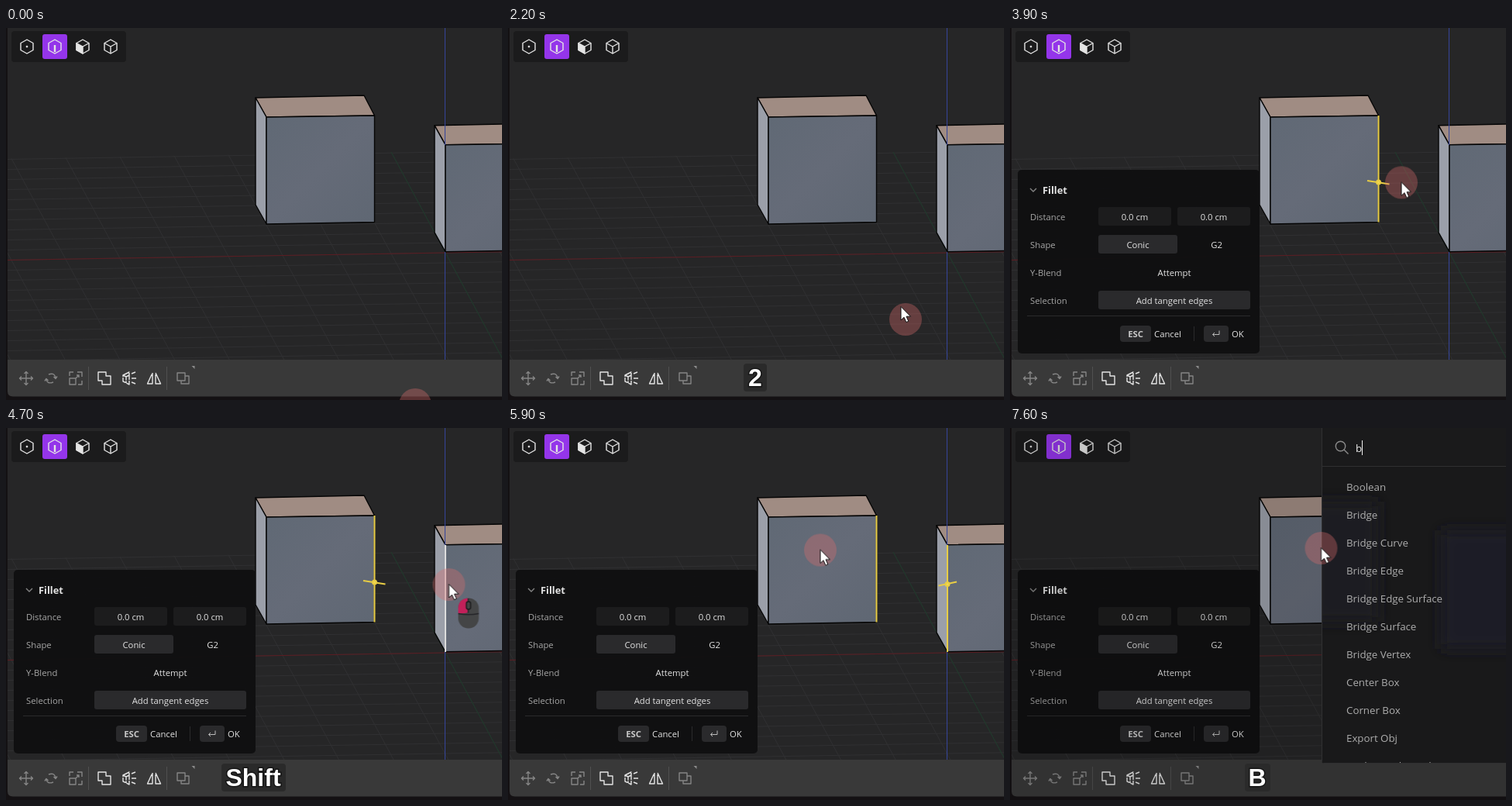
Write an HTML page that moves like this. It is 640 by 480 pixels and loops after 8000 ms.

```html
<!DOCTYPE html>
<html lang="en">
<head>
<meta charset="utf-8">
<title>Fillet two edges</title>
<style>
html, body { margin: 0; width: 100%; height: 100%; overflow: hidden; background: #141113; }
svg { display: block; width: 100vw; height: 100vh; }
text { font-family: "Open Sans", "Noto Sans", sans-serif; font-size: 11.3px; fill: #e2e2e2; }
.line { fill: none; stroke: #e4e4e4; stroke-width: 1.4; stroke-linejoin: round; }
.off { stroke: #858585; }
.mid { text-anchor: middle; font-weight: 500; }
.label { fill: #a6a6a6; }
.bold { font-weight: 700; }
.item { font-size: 13.3px; fill: #adadad; }
.tool { font-size: 13px; }
.key text { font: bold 32px "Liberation Sans", Arial, sans-serif; text-anchor: middle; fill: #fff; stroke: #151515; stroke-width: 3px; paint-order: stroke; }
.key rect { fill: #2a2a2a; }
.cube { stroke: #050505; stroke-width: 1.4; stroke-linejoin: round; }
.pick { stroke: #e8cd45; stroke-width: 2; }
.hover { stroke: #f2f2f2; stroke-width: 1.8; }

/* 100 ms is 1.25 % of the loop */
.t { animation: 8s step-end -20ms infinite; }
.two { animation-name: two; }
.shift { animation-name: shift; }
.keyF { animation-name: keyF; }
.keyB { animation-name: keyB; }
.click { animation-name: click; }
.hover1 { animation-name: hover1; }
.hover2 { animation-name: hover2; }
.filletOn { animation-name: filletOn; }
.first { animation-name: first; }
.second { animation-name: second; }
.dim { animation-name: dim; }
.all { animation-name: all; }
.blink { animation-name: blink; }
.found { animation-name: found; }
.pointer { animation-name: pointer; }
.halo { animation-name: halo; }

@keyframes two { 0%, 31.25% { visibility: hidden } 21.25% { visibility: visible } }
@keyframes shift { 0%, 61.25% { visibility: hidden } 51.25% { visibility: visible } }
@keyframes keyF { 0%, 90% { visibility: hidden } 80% { visibility: visible } }
@keyframes keyB { 0% { visibility: hidden } 91.25%, 100% { visibility: visible } }
@keyframes click { 0%, 45%, 62.5% { visibility: hidden } 41.25%, 58.75% { visibility: visible } }
@keyframes hover1 { 0%, 41.25% { visibility: hidden } 36.25% { visibility: visible } }
@keyframes hover2 { 0%, 61.25% { visibility: hidden } 53.75% { visibility: visible } }
@keyframes filletOn { 0% { visibility: hidden } 46.25%, 100% { visibility: visible } }
@keyframes first { 0%, 61.25% { visibility: hidden } 46.25% { visibility: visible } }
@keyframes second { 0% { visibility: hidden } 61.25%, 100% { visibility: visible } }
@keyframes dim { 0% { visibility: hidden } 81.25%, 100% { visibility: visible } }
@keyframes all { 0%, 92.5% { visibility: hidden } 81.25% { visibility: visible } }
@keyframes blink { 0%, 87.5% { visibility: hidden } 81.25% { visibility: visible } }
@keyframes found { 0% { visibility: hidden } 92.5%, 100% { visibility: visible } }
@keyframes pointer {
  0% { transform: translate(528px, 486px) }
  5% { transform: translate(528px, 486px); animation-timing-function: steps(8) }
  15% { transform: translate(517px, 386px) }
  27.5% { transform: translate(507px, 360px); animation-timing-function: steps(4) }
  32.5% { transform: translate(592px, 285px); animation-timing-function: steps(3) }
  36.25% { transform: translate(492px, 204px) }
  37.5% { transform: translate(484px, 198px) }
  38.75% { transform: translate(486px, 199px) }
  47.5% { transform: translate(486px, 199px); animation-timing-function: steps(3) }
  51.25% { transform: translate(543px, 200px); animation-timing-function: steps(3) }
  55% { transform: translate(571.5px, 202px) }
  63.75% { transform: translate(571.5px, 202px); animation-timing-function: steps(8) }
  73.75% { transform: translate(403px, 157.5px) }
  75% { transform: translate(404px, 157px) }
  76.25%, 100% { transform: translate(401.5px, 155px) }
}
@keyframes halo {
  0%, 28.75% { transform: none }
  27.5% { transform: translate(6px, 16px) }
}
</style>
</head>
<body>
<svg viewBox="0 0 640 480" preserveAspectRatio="none">
  <defs>
    <linearGradient id="front" x1="0" y1="0" x2="1" y2="1">
      <stop offset="0" stop-color="#606975"/><stop offset=".5" stop-color="#656b78"/><stop offset="1" stop-color="#5f6773"/>
    </linearGradient>
    <filter id="soft" x="-50%" y="-50%" width="200%" height="200%"><feGaussianBlur stdDeviation="9"/></filter>
    <clipPath id="tall"><path d="M402 0H640V480H402z"/></clipPath>
    <clipPath id="short"><path d="M402 0H640V433H406q-4 0-4-4z"/></clipPath>
    <clipPath id="view"><path d="M2 0H640V428H2z"/></clipPath>
    <path id="hex" d="M0-9 8-4.5V4.5L0 9-8 4.5V-4.5z"/>
    <g id="cube" class="cube">
      <path fill="#a08c83" d="M322 90 462 87 475.5 113 336 115z"/>
      <path fill="#9b9fa9" d="M322 90 336 115V253L322 228z"/>
      <path fill="url(#front)" d="M336 115 475.5 113V250.5L336 253z"/>
    </g>
    <g id="glass">
      <path fill="#19191a" d="M402 0H640V480H402z"/>
      <g filter="url(#soft)">
        <path fill="#1e1e21" d="M390 95H475V250H390z"/>
        <path fill="#1d1f25" d="M556 132H660V285H556z"/>
      </g>
      <path fill="#1a1a1b" d="M402 0H640V49H402z"/>
      <path stroke="#303031" d="M402.5 0V480M402 49.5H640"/>
      <g class="line" stroke-width="1.5" style="stroke:#8a8a8a"><circle cx="426.500" cy="23.500" r="6.200"/><path d="M431 28 436.500 33.500"/></g>
    </g>
  </defs>

  <rect width="640" height="480" fill="#141113"/>
  <g clip-path="url(#view)">
    <rect x="2" width="638" height="428" fill="#262627"/>
    <g id="grid" stroke="#303032"></g>
    <path stroke="#5c1c22" d="M0 299.500 567 290 640 288.800"/>
    <path stroke="#1d3a2a" d="M497 160 643 431"/>
    <use href="#cube"/>
    <use href="#cube" x="231" y="35.800"/>
    <path stroke="#35459a" d="M566.500 0V151M566.500 289V428"/>
    <path class="hover t hover1" d="M475.500 113V250.500"/>
    <path class="hover t hover2" d="M567 151V289"/>
    <path class="pick t filletOn" d="M475.500 113V250.500"/>
    <path class="pick t second" d="M567 151V289"/>
    <g class="pick t first" fill="#f3d94e"><path d="M461 197 489.500 201.500"/><circle cx="475.500" cy="199" r="2.500"/></g>
    <g class="pick t second" fill="#f3d94e"><path d="M555.500 203.500 579 198.500"/><circle cx="567" cy="201.500" r="2.500"/></g>
  </g>

  <path fill="#393939" d="M2 428H640V475.500H9q-7 0-7-7z"/>
  <path stroke="#505050" d="M106.500 437V467M207.500 437V467"/>
  <g class="line off">
    <path d="M26 443.500V460.500M17.500 452H34.500M23.500 446 26 443.500 28.500 446M23.500 458 26 460.500 28.500 458M20 449.500 17.500 452 20 454.500M32 449.500 34.500 452 32 454.500"/>
    <path d="M55 447q8-3 9 5M61.500 450 64 452.500 66 449.500M61 457q-8 3-9-4M50 455.500 52 452.500 54.500 455"/>
    <path d="M82 449V444H87M92 444H98V450M98 455V460H93M82 452H90V460H82zM90 452 94 448M91 448H94V451"/>
    <path d="M221 445H231V455H221zM226 455V459H236V449H231"/>
  </g>
  <path fill="#8c8c8c" d="M239.500 436H243.500V440z"/>
  <g class="line">
    <path d="M119 444H129V449H135V460H124V455H119z"/>
    <path d="M151 448 159 444V460L151 456zM151 448 155 450V458M155 450 159 448M162 446 167 444M162 452H168M162 457 167 459" stroke-dasharray="9 1"/>
    <path d="M189 445V459H182.500zM193 445 199.500 459H193z" stroke-dasharray="34 2 2 2"/>
  </g>

  <rect x="7" y="4" width="148" height="40" rx="4" fill="#1b1b1c"/>
  <rect x="47" y="8" width="32" height="32" rx="3" fill="#9435ea"/>
  <g class="line">
    <g transform="translate(27 24)"><use href="#hex"/><circle r="1" fill="#fff" stroke-width=".8"/></g>
    <g transform="translate(63 24)"><use href="#hex"/><path stroke-width="2.400" d="M0-2V7"/></g>
    <g transform="translate(99 24)"><use href="#hex"/><path fill="#e4e4e4" d="M-8-4.500 0 0V9L-8 4.500z"/><path d="M0 0 8-4.500"/></g>
    <g transform="translate(135 24)"><use href="#hex"/><path d="M-8-4.500 0 0 8-4.500M0 0V9"/></g>
  </g>

  <g class="t filletOn">
    <rect x="10" y="183" width="312" height="237" rx="5" fill="#101011" fill-opacity=".97"/>
    <path class="line off" d="M26 207 30 211 34 207"/>
    <text class="bold" x="42" y="213.500" style="font-size:12.800px">Fillet</text>
    <g fill="#1c1c1d"><rect x="114" y="231" width="94" height="24" rx="3"/><rect x="216" y="231" width="94" height="24" rx="3"/></g>
    <g fill="#2a2a2c">
      <rect x="114" y="267" width="102" height="24" rx="3"/><rect x="114" y="339" width="196" height="24" rx="3"/>
      <rect x="142" y="384" width="40" height="21" rx="4"/><rect x="250" y="384" width="32" height="21" rx="4"/>
    </g>
    <path stroke="#2b2b2c" d="M22 371.500H310M237.500 385V404"/>
    <text class="label" x="26" y="247.500">Distance</text>
    <text class="label" x="26" y="283.500">Shape</text>
    <text class="label" x="26" y="319.500">Y-Blend</text>
    <text class="label" x="26" y="355.500">Selection</text>
    <text class="mid" x="161" y="247.500">0.0 cm</text>
    <text class="mid" x="263" y="247.500">0.0 cm</text>
    <text class="mid" x="165" y="283.500">Conic</text>
    <text class="mid" x="266.500" y="283.500">G2</text>
    <text class="mid" x="212" y="319.500">Attempt</text>
    <text class="mid" x="212" y="355.500">Add tangent edges</text>
    <text class="mid bold" x="162" y="398.500" style="fill:#c8c8c8">ESC</text>
    <text x="186" y="398.500">Cancel</text>
    <path class="line" stroke-width="1" style="stroke:#bbb;stroke-width:1" d="M270 390.500V395.500H261.500M264 393 261.500 395.500 264 398"/>
    <text x="286" y="398.500">OK</text>
  </g>

  <rect class="t dim" width="640" height="480" opacity=".12"/>
  <g class="t all" clip-path="url(#tall)">
    <use href="#glass"/>
    <path stroke="#303031" d="M402 98.500H640"/>
    <text class="item" x="446" y="30.500" style="font-size:12.800px;fill:#858585">Search...</text>
    <text class="tool" x="418" y="77">De</text>
    <text class="tool" x="526.500" y="77">Re</text>
    <text class="tool" x="635.500" y="77">E</text>
    <g class="line">
      <path d="M454 78q8-19 16 0"/><circle cx="453.500" cy="79" r="1.500"/><circle cx="470.500" cy="79" r="1.500"/>
      <path d="M489 70 498 65 507 70 498 75zM491 72V78L498 82.500 505 78V72M498 75V82"/>
      <path d="M563 81H567q4 0 3-5t3-9H578M563 79V83M577 65V69"/>
      <path d="M598 73 606 66 610 68 614 74 611 76 608 72 605 74 602 76zM605 73 599 82"/>
    </g>
    <g id="allItems"></g>
  </g>
  <path class="t blink" stroke="#eee" d="M446.500 16V35"/>
  <g class="t found" clip-path="url(#short)">
    <use href="#glass"/>
    <text class="item" x="446" y="30.500" style="fill:#eee">b</text>
    <path stroke="#eee" d="M454.500 16V35"/>
    <g id="foundItems"></g>
    <path stroke="#303031" d="M402 432.500H640"/>
  </g>

  <g class="key t two"><rect x="304" y="433" width="30" height="36" rx="4"/><text x="319" y="462">2</text></g>
  <g class="key t shift"><rect x="278" y="433" width="83" height="36" rx="4"/><text x="319" y="462">Shift</text></g>
  <g class="key t keyF"><rect x="305" y="433" width="30" height="36" rx="4"/><text x="319" y="462">F</text></g>
  <g class="key t keyB"><rect x="303" y="433" width="33" height="36" rx="4"/><text x="319" y="462">B</text></g>

  <g class="t pointer">
    <circle class="t halo" r="21" fill="#dc6e6e" fill-opacity=".35"/>
    <g class="t click">
      <rect x="12" y="17.500" width="26.500" height="39" rx="13" fill="#444546"/>
      <path fill="#c2205a" d="M24.500 17.500q-12.500 1-12.500 14V37q7 1 12.500-1z"/>
      <path fill="none" stroke="#26262a" stroke-width="1.500" d="M25 18V22M25 32V36.500M12 37.500q13 2.500 26.500 0"/>
      <rect x="22.500" y="22" width="5.500" height="10" rx="2.700" fill="#444546" stroke="#1c1c1e" stroke-width="1.500"/>
    </g>
    <path fill="#fff" stroke="#111" d="M0-.5V17L4 13.300 6.800 19.600 9.800 18.300 7 12.200H12.500z"/>
  </g>
</svg>
<script>
const byId = id => document.getElementById(id);

// Ground cells, stepped left/right along red and up/down along green
let lines = "";
for (let i = -10; i <= 10; i++) {
  const y = 290 + 13 * i;
  const x = 567 + 70 * i;
  lines += `M0 ${y + 9.5}L640 ${y - 1.2}`;
  lines += `M${x - 70} ${160 - i * 1.2}L${x + 76} ${431 - i * 1.2}`;
}
byId("grid").innerHTML = `<path fill="none" d="${lines}"/>`;

const bridges = ["Boolean", "Bridge", "Bridge Curve", "Bridge Edge", "Bridge Edge Surface",
  "Bridge Surface", "Bridge Vertex", "Center Box"];
const fillList = (id, names, top) => {
  byId(id).innerHTML = names.map((name, i) =>
    `<text class="item" x="434" y="${top + 36 * i}">${name}</text>`).join("");
};
fillList("allItems", ["Alternative Duplicate", ...bridges, "Center Circle"], 130);
fillList("foundItems", [...bridges, "Corner Box", "Export Obj", "Find Boundary Edge"], 81);
</script>
</body>
</html>
```
